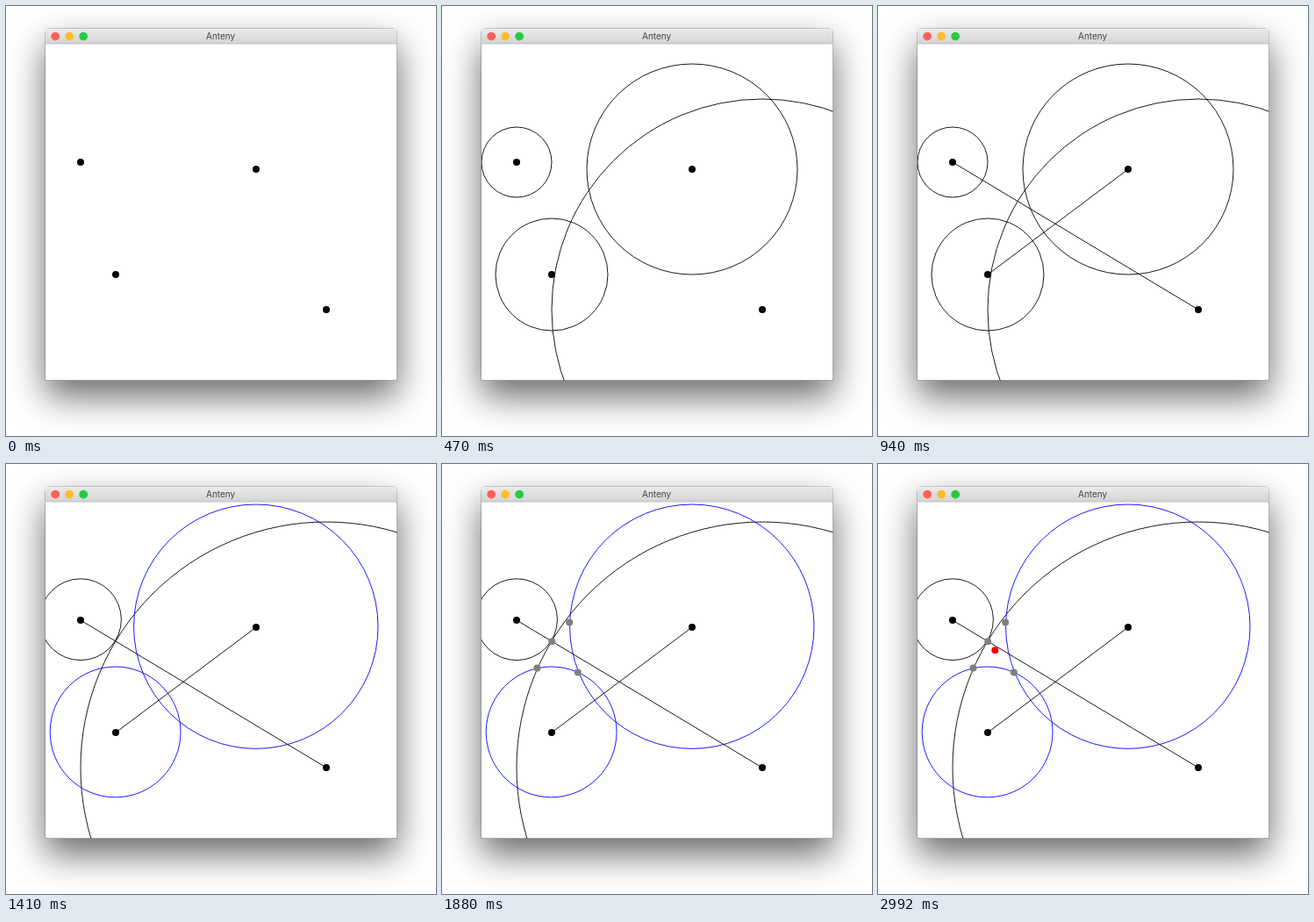
Recreate the animation shown at these times as an HTML page with a canvas. Size 490 px wide and 490 px high, loop 3.42 s.

```html
<!DOCTYPE html>
<html lang="pl">
<head>
<meta charset="utf-8">
<title>Anteny</title>
<style>
  html, body { margin: 0; width: 100%; height: 100%; overflow: hidden; background: #fff; }
  canvas { display: block; width: 490px; height: 490px; }
</style>
</head>
<body>
<canvas id="stage" width="490" height="490"></canvas>
<script>
const ctx = document.getElementById('stage').getContext('2d');
const STEP = 470, LOOP = 3420, LAST_STAGE = 5;
const WIN = { x: 45, y: 26, w: 400.5, h: 400.5, bar: 17 };

// before / after: [centre x, centre y, radius] of the signal range
const antennas = [
  { x: 85, y: 178, before: [85, 178, 40], after: [85, 177.2, 46.4], color: '#000' },
  { x: 365, y: 346, before: [365, 346, 240], after: [365, 346, 280], color: '#000' },
  { x: 125, y: 306, before: [125, 306, 64], after: [124.6, 305.4, 74.4], color: '#00f' },
  { x: 285, y: 186, before: [285, 186, 120], after: [284.8, 185.2, 139.2], color: '#00f' }
];
const links = [[0, 1], [2, 3]];
const crossings = [[125.2, 202.2], [108.5, 232.5], [145.2, 180.6], [154.8, 237.4]];
const result = [133.3, 212.2];

function dot(x, y, color, r = 4) {
  ctx.fillStyle = color;
  ctx.beginPath();
  ctx.arc(x, y, r, 0, Math.PI * 2);
  ctx.fill();
}

function ring([x, y, r], color) {
  ctx.strokeStyle = color;
  ctx.beginPath();
  ctx.arc(x, y, r, 0, Math.PI * 2);
  ctx.stroke();
}

function line(a, b) {
  ctx.strokeStyle = '#000';
  ctx.beginPath();
  ctx.moveTo(a.x, a.y);
  ctx.lineTo(b.x, b.y);
  ctx.stroke();
}

function windowPath() {
  ctx.beginPath();
  ctx.roundRect(WIN.x, WIN.y, WIN.w, WIN.h, [4, 4, 0, 0]);
}

function drawWindow() {
  ctx.fillStyle = '#fff';
  ctx.fillRect(0, 0, 490, 490);

  ctx.save();
  ctx.shadowColor = 'rgba(0,0,0,.6)';
  ctx.shadowBlur = 40;
  ctx.shadowOffsetY = 18;
  windowPath();
  ctx.fill();
  ctx.restore();

  ctx.strokeStyle = 'rgba(0,0,0,.35)';
  ctx.lineWidth = 1;
  windowPath();
  ctx.stroke();

  ctx.save();
  windowPath();
  ctx.clip();
  ctx.fillStyle = '#fff';
  ctx.fillRect(WIN.x, WIN.y, WIN.w, WIN.h);
  const shade = ctx.createLinearGradient(0, WIN.y, 0, WIN.y + WIN.bar);
  shade.addColorStop(0, '#ebebeb');
  shade.addColorStop(1, '#d3d3d3');
  ctx.fillStyle = shade;
  ctx.fillRect(WIN.x, WIN.y, WIN.w, WIN.bar);
  ctx.fillStyle = '#b4b4b4';
  ctx.fillRect(WIN.x, WIN.y + WIN.bar - 0.4, WIN.w, 0.8);
  ctx.restore();

  ['#ff5f57', '#ffbd2e', '#28ca42'].forEach((c, i) => dot(56.2 + 16 * i, 34.6, c, 4.9));

  ctx.fillStyle = '#444';
  ctx.font = '10px Inter, Roboto, sans-serif';
  ctx.textAlign = 'center';
  ctx.fillText('Anteny', 244.6, 38.4);
}

function drawPlot(stage) {
  ctx.save();
  ctx.beginPath();
  ctx.rect(WIN.x, WIN.y + WIN.bar, WIN.w, WIN.h - WIN.bar);
  ctx.clip();
  ctx.lineWidth = 0.9;

  for (const a of antennas) {
    if (stage >= 3) ring(a.after, a.color);
    else if (stage >= 1) ring(a.before, '#000');
  }
  if (stage >= 2) links.forEach(([i, j]) => line(antennas[i], antennas[j]));
  antennas.forEach(a => dot(a.x, a.y, '#000'));
  if (stage >= 4) crossings.forEach(([x, y]) => dot(x, y, '#808080'));
  if (stage >= 5) dot(...result, '#f00');
  ctx.restore();
}

let shown = -1;
function render(now) {
  const stage = Math.min(LAST_STAGE, Math.floor((now % LOOP) / STEP));
  if (stage !== shown) {
    drawWindow();
    drawPlot(stage);
    shown = stage;
  }
}

const start = performance.now();
function tick() {
  render(performance.now() - start);
  requestAnimationFrame(tick);
}
tick();
</script>
</body>
</html>
```
